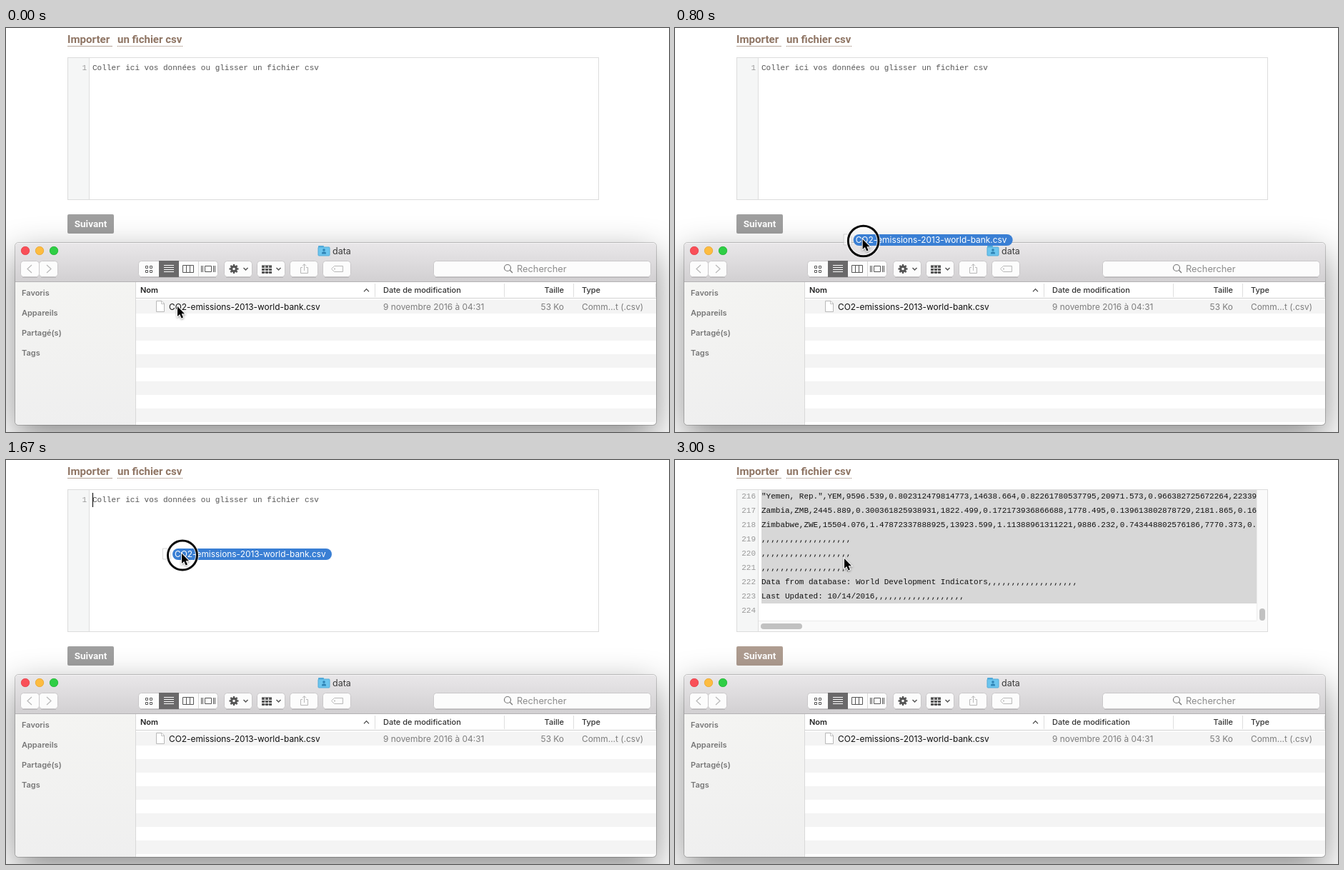
These frames come from a looping animation (928x566 px, 3.07 s). An HTML page with a canvas:

```html
<!DOCTYPE html>
<html lang="fr">
<head>
<meta charset="utf-8">
<title>Importer un fichier csv</title>
<style>
html, body { margin: 0; width: 100%; height: 100%; overflow: hidden; background: #fff; }
canvas { display: block; width: 928px; height: 566px; }
</style>
</head>
<body>
<canvas id="stage" width="928" height="566"></canvas>
<script>
const ctx = document.getElementById('stage').getContext('2d');
const LOOP = 3070, FPS = 15;
const UI = 'Inter, "Open Sans", sans-serif';
const WEB = 'Roboto, Inter, sans-serif';
const MONO = '11px "Liberation Mono", "DejaVu Sans Mono", monospace';
const FILE = 'CO2-emissions-2013-world-bank.csv';
const PRESS = 500, RELEASE = 1800, LOADED = 2260;
const COMMAS = ','.repeat(19);
const LINES = [
  '"Yemen, Rep.",YEM,9596.539,0.802312479814773,14638.664,0.82261780537795,20971.573,0.966382725672264,22339.364',
  'Zambia,ZMB,2445.889,0.300361825938931,1822.499,0.172173936866688,1778.495,0.139613802878729,2181.865,0.166',
  'Zimbabwe,ZWE,15504.076,1.47872337888925,13923.599,1.11388961311221,9886.232,0.743448802576186,7770.373,0.5',
  COMMAS, COMMAS, COMMAS,
  'Data from database: World Development Indicators' + COMMAS,
  'Last Updated: 10/14/2016' + COMMAS,
  ''
];
// time, x, y of the pointer tip
const PATH = [
  [0, 240, 390], [400, 238, 390], [530, 240, 390], [600, 265, 389],
  [1070, 259, 150], [1600, 246, 131], [1800, 246, 131], [2000, 244.5, 131],
  [2500, 244.5, 131], [2930, 237, 138], [3070, 237, 138]
];

const clamp = v => Math.min(1, Math.max(0, v));
const ease = v => v * v * (3 - 2 * v);

function rect(x, y, w, h, fill) {
  ctx.fillStyle = fill;
  ctx.fillRect(x, y, w, h);
}

function round(x, y, w, h, r, fill, stroke) {
  ctx.beginPath();
  ctx.roundRect(x, y, w, h, r);
  if (fill) { ctx.fillStyle = fill; ctx.fill(); }
  if (stroke) { ctx.strokeStyle = stroke; ctx.lineWidth = 1; ctx.stroke(); }
}

function disc(x, y, r, fill) {
  ctx.beginPath();
  ctx.arc(x, y, r, 0, Math.PI * 2);
  ctx.fillStyle = fill;
  ctx.fill();
}

function circle(x, y, r, color, width) {
  ctx.beginPath();
  ctx.arc(x, y, r, 0, Math.PI * 2);
  ctx.strokeStyle = color;
  ctx.lineWidth = width;
  ctx.stroke();
}

function line(points, color, width = 1) {
  ctx.beginPath();
  points.forEach(([x, y]) => ctx.lineTo(x, y));
  ctx.strokeStyle = color;
  ctx.lineWidth = width;
  ctx.stroke();
}

function text(str, x, y, font, fill, align = 'left') {
  ctx.font = font;
  ctx.fillStyle = fill;
  ctx.textAlign = align;
  ctx.fillText(str, x, y);
}

function fade(y0, y1, a, b) {
  const g = ctx.createLinearGradient(0, y0, 0, y1);
  g.addColorStop(0, a);
  g.addColorStop(1, b);
  return g;
}

function editor(loaded, caret) {
  rect(86, 41, 744, 200, '#dcdcdc');
  rect(87, 42, 742, 198, '#fff');
  rect(87, 42, 29, 198, '#f5f6f6');
  rect(116, 42, 1, 198, '#dedede');
  if (!loaded) {
    text('1', 113, 59, MONO, '#999', 'right');
    text('Coller ici vos données ou glisser un fichier csv', 121, 59, MONO, '#555');
    if (caret) rect(121, 46, 1, 20, '#000');
    return;
  }
  rect(121, 42, 693, 159, '#d7d7d7');
  ctx.save();
  ctx.beginPath();
  ctx.rect(87, 42, 727, 183);
  ctx.clip();
  LINES.forEach((s, i) => {
    const y = 54 + i * 20;
    text(String(216 + i), 113, y, MONO, '#999', 'right');
    text(s, 121, y, MONO, '#111');
  });
  ctx.restore();
  rect(117, 225, 697, 15, '#fafafa');
  rect(117, 225, 697, 1, '#ececec');
  rect(814, 42, 15, 198, '#fafafa');
  rect(814, 42, 1, 183, '#ececec');
  round(120, 229, 58, 8, 4, '#c1c1c1');
  round(818, 208, 8, 17, 4, '#c1c1c1');
}

function page(t) {
  const loaded = t >= LOADED, brown = '#8f7564';
  rect(0, 0, 928, 566, '#fff');
  text('Importer', 86, 21, `700 15.1px ${WEB}`, brown);
  text('un fichier csv', 156, 21, `700 15px ${WEB}`, brown);
  rect(86, 25, 63, 1, '#b3a297');
  for (let x = 156; x < 247; x += 2) rect(x, 25, 1, 1, brown);
  editor(loaded, pointer(t)[1] < 241);
  round(86, 261, 65, 27, 2, loaded ? '#ae9c90' : '#9f9f9f');
  text('Suivant', 118.5, 279, `700 13.5px ${WEB}`, '#fff', 'center');
}

function button(x, w) {
  round(x + .5, 326.5, w - 1, 22, 4, '#fcfcfc', '#c9c7c9');
  rect(x + 3, 349, w - 6, 1, '#b9b7b9');
}

function chevron(x, y, w, h, color, width) {
  line([[x - w, y - h], [x, y + h], [x + w, y - h]], color, width);
}

function toolbar() {
  const ink = '#555', pale = '#b8b8b8';
  button(20, 27);
  button(46, 27);
  line([[36, 332], [30, 337.5], [36, 343]], pale, 1.2);
  line([[57, 332], [63, 337.5], [57, 343]], pale, 1.2);

  button(185, 112);
  rect(214, 326, 28, 23, '#6a696a');
  rect(269, 327, 1, 21, '#d8d8d8');
  for (const x of [195.5, 201.5])
    for (const y of [333.5, 339.5]) round(x, y, 3, 3, 0, null, ink);
  for (let i = 0; i < 4; i++) rect(221, 332 + i * 3, 14, 1, '#fff');
  round(247.5, 332.5, 15, 10, 0, null, ink);
  rect(252, 333, 1, 10, ink);
  rect(257, 333, 1, 10, ink);
  round(278.5, 333.5, 9, 8, 0, null, ink);
  for (const x of [273, 275, 290, 292]) rect(x, 333, 1, 9, ink);

  button(305, 40);
  for (let i = 0; i < 4; i++) {
    const a = i * Math.PI / 4, c = 6.5 * Math.cos(a), s = 6.5 * Math.sin(a);
    line([[319 - c, 337.5 - s], [319 + c, 337.5 + s]], ink, 2.4);
  }
  disc(319, 337.5, 4.8, ink);
  disc(319, 337.5, 1.8, '#fcfcfc');
  chevron(335.5, 337.5, 3, 1.6, ink, 1.4);

  button(351, 40);
  for (let i = 0; i < 3; i++) {
    rect(358, 332 + i * 5, 14, 1, '#999');
    for (let k = 0; k < 3; k++) rect(358 + k * 5, 333 + i * 4, 4, 3, ink);
  }
  chevron(381.5, 337.5, 3, 1.6, ink, 1.4);

  button(397, 40);
  line([[415, 335.5], [412.5, 335.5], [412.5, 343.5], [422.5, 343.5], [422.5, 335.5], [420, 335.5]], pale);
  line([[417.5, 340], [417.5, 331]], pale);
  chevron(417.5, 332, 2.5, -1.3, pale, 1);

  button(443, 40);
  ctx.beginPath();
  ctx.moveTo(455.5, 337.5);
  ctx.lineTo(459.5, 333.5);
  ctx.lineTo(471.5, 333.5);
  ctx.lineTo(471.5, 341.5);
  ctx.lineTo(459.5, 341.5);
  ctx.closePath();
  ctx.strokeStyle = pale;
  ctx.lineWidth = 1;
  ctx.stroke();
  disc(460, 337.5, 1, pale);

  button(598, 305);
  circle(702, 336, 4.5, '#777', 1.2);
  line([[705.3, 339.3], [709, 343]], '#777', 1.3);
  text('Rechercher', 715, 342, `12.8px ${UI}`, '#8c8c8c');
}

function sheet(x, y) {
  ctx.beginPath();
  ctx.moveTo(x + .5, y + .5);
  ctx.lineTo(x + 8, y + .5);
  ctx.lineTo(x + 11.5, y + 4);
  ctx.lineTo(x + 11.5, y + 15.5);
  ctx.lineTo(x + .5, y + 15.5);
  ctx.closePath();
  ctx.fillStyle = '#fff';
  ctx.fill();
  ctx.strokeStyle = '#b9b9b9';
  ctx.lineWidth = 1;
  ctx.stroke();
  line([[x + 7.5, y + 1], [x + 7.5, y + 4.5], [x + 11, y + 4.5]], '#c4c4c4');
}

function finder() {
  ctx.save();
  ctx.shadowColor = 'rgba(0,0,0,.46)';
  ctx.shadowBlur = 50;
  ctx.shadowOffsetY = 18;
  round(13, 301, 897, 255, 5, '#fff');
  ctx.restore();
  round(12.5, 300.5, 898, 256, 5, null, 'rgba(0,0,0,.2)');

  ctx.save();
  ctx.beginPath();
  ctx.roundRect(13, 301, 897, 255, 5);
  ctx.clip();
  rect(13, 301, 897, 55, fade(301, 355, '#e9e7e9', '#d2d0d2'));
  rect(13, 301, 897, 1, '#f5f4f5');
  rect(13, 355, 897, 1, '#b4b2b4');
  rect(13, 356, 168, 200, fade(356, 556, '#f4f4f2', '#efefef'));
  rect(181, 356, 1, 200, '#d9d9d9');
  for (let y = 381; y < 556; y += 38) rect(182, y, 728, 19, '#f4f4f4');
  rect(182, 378, 728, 1, '#d2d2d2');
  for (const x of [516, 697, 794, 909]) rect(x, 358, 1, 19, '#dedede');
  ctx.restore();

  [['#f94f58', '#dd3f48'], ['#fdbc40', '#dfa033'], ['#2fce45', '#24ac37']].forEach(([fill, edge], i) => {
    disc(27 + i * 20, 312, 6, fill);
    circle(27 + i * 20, 312, 5.7, edge, .6);
  });

  round(437, 305, 8, 5, 1, '#4fa9d8');
  round(437, 307, 16, 12, 1, '#6cc5ee', '#52abd8');
  disc(445, 311, 1.8, '#2f83b4');
  round(442, 313.5, 6, 3, [2, 2, 0, 0], '#2f83b4');
  text('data', 457, 317, `12.5px ${UI}`, '#3a3a3a');
  toolbar();

  ['Favoris', 'Appareils', 'Partagé(s)', 'Tags'].forEach((s, i) =>
    text(s, 22, 375 + i * 28, `600 11px ${UI}`, '#777'));

  const head = `500 11px ${UI}`, row = `11.9px ${UI}`, grey = '#7d7d7d';
  text('Nom', 188, 371, `600 11px ${UI}`, '#222');
  text('Date de modification', 528, 371, head, '#333');
  text('Taille', 781, 371, head, '#333', 'right');
  text('Type', 806, 371, head, '#333');
  chevron(504.5, 367.5, 3.5, -1.8, '#444', 1.2);

  sheet(210, 382);
  text(FILE, 228, 395, row, '#111');
  text('9 novembre 2016 à 04:31', 528, 395, row, grey);
  text('53 Ko', 781, 395, row, grey, 'right');
  text('Comm…t (.csv)', 806, 395, row, grey);
}

function pointer(t) {
  let i = 0;
  while (i < PATH.length - 2 && t >= PATH[i + 1][0]) i++;
  const [t0, x0, y0] = PATH[i], [t1, x1, y1] = PATH[i + 1];
  const k = ease(clamp((t - t0) / (t1 - t0)));
  return [x0 + (x1 - x0) * k, y0 + (y1 - y0) * k];
}

function dragged(x, y, alpha) {
  ctx.save();
  ctx.globalAlpha = alpha * .55;
  sheet(x - 27, y - 7.5);
  ctx.globalAlpha = alpha;
  round(x - 13, y - 7, 223, 16, 8, '#3a7fd4');
  text(FILE, x - 10, y + 5, `11.9px ${UI}`, '#fff');
  ctx.restore();
}

function ring(x, y, r, alpha) {
  ctx.save();
  ctx.globalAlpha = alpha;
  circle(x, y, r, 'rgba(255,255,255,.8)', 5);
  circle(x, y, r, '#0a0a0a', 3);
  ctx.restore();
}

function forbidden(x, y) {
  disc(x, y, 9.5, 'rgba(255,255,255,.9)');
  circle(x, y, 7.5, '#a5a5a5', 2.4);
  line([[x - 5, y - 5], [x + 5, y + 5]], '#a5a5a5', 2.4);
}

function arrow(x, y) {
  const shape = [[0, 0], [0, 14], [3.2, 11], [5.6, 16.4], [8, 15.4], [5.7, 10.2], [10, 10.2]];
  ctx.save();
  ctx.translate(x, y);
  ctx.beginPath();
  shape.forEach(([a, b]) => ctx.lineTo(a, b));
  ctx.closePath();
  ctx.shadowColor = 'rgba(0,0,0,.4)';
  ctx.shadowBlur = 3;
  ctx.shadowOffsetY = 1;
  ctx.strokeStyle = '#fff';
  ctx.lineWidth = 2;
  ctx.stroke();
  ctx.shadowColor = 'transparent';
  ctx.fillStyle = '#000';
  ctx.fill();
  ctx.restore();
}

function draw(t) {
  const [x, y] = pointer(t);
  page(t);
  finder();
  if (t >= 530 && t < RELEASE + 150) dragged(x, y, 1 - clamp((t - RELEASE) / 150));
  if (t >= PRESS && t < RELEASE) {
    const k = clamp((t - PRESS) / 310);
    ring(x + 1, y + 2.5, 45.5 - 25 * k, clamp((t - PRESS + 50) / 100));
  } else if (t >= RELEASE && t < RELEASE + 200) {
    const k = (t - RELEASE) / 200;
    ring(x + 1, y + 2.5, 20.5 + 25 * k, 1 - k);
  }
  if (t >= 560 && t < RELEASE && y > 300) forbidden(x + 10, y + 23);
  arrow(x, y);
}

const start = performance.now();
function tick() {
  const t = (performance.now() - start) % LOOP;
  draw(Math.floor(t * FPS / 1000 + 1e-6) * 1000 / FPS);
  requestAnimationFrame(tick);
}
tick();
</script>
</body>
</html>
```
